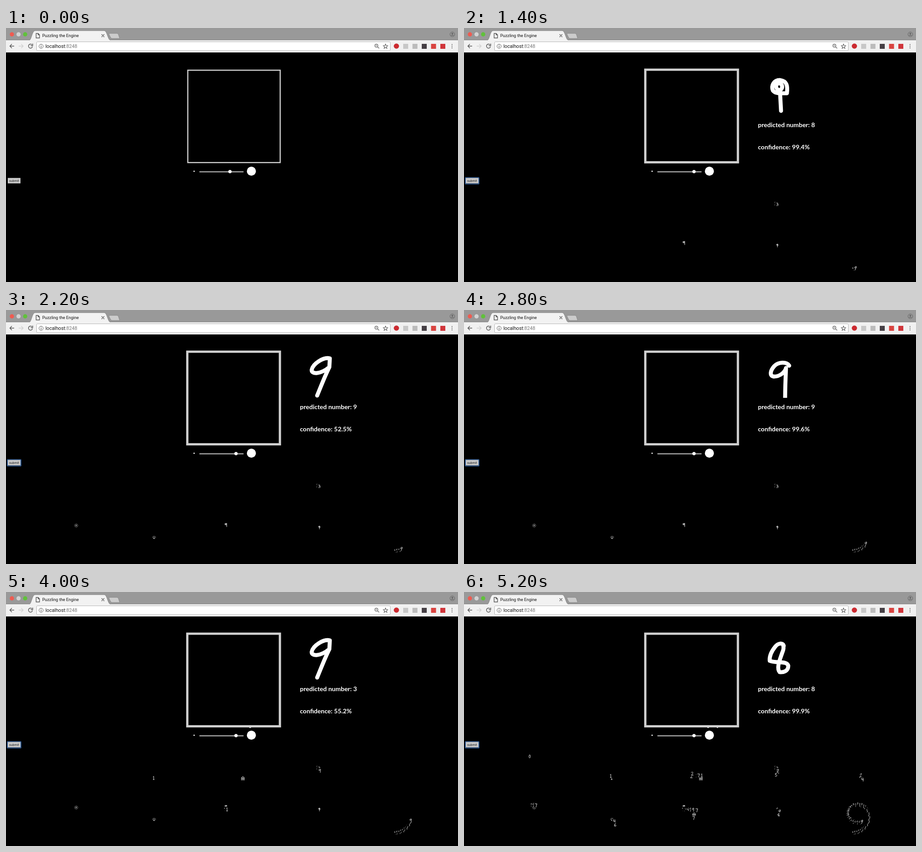
Write an HTML page with a canvas that moves like this. It is 998 px wide and 561 px high and loops after 6.2 s.

```html
<!DOCTYPE html>
<html lang="en">
<head>
<meta charset="utf-8">
<title>Digit sketches</title>
<style>
  html, body { margin: 0; width: 100%; height: 100%; overflow: hidden; background: #000; }
  svg, canvas { position: absolute; left: 0; top: 0; width: 998px; height: 561px; }
  text { font-family: Roboto, sans-serif; }
  .result { font: bold 14px Lato, sans-serif; fill: #fff; }
  .icon { fill: none; stroke: #555; stroke-width: 1.4; }
</style>
</head>
<body>
<svg viewBox="0 0 998 561">
  <!-- browser window -->
  <path fill="#999" d="M0 0H998V27H0z"/>
  <path fill="#f1f1f1" d="M0 27H998V54H0z"/>
  <path stroke="#858585" d="M0 26.5H998"/>
  <path fill="#f2f2f2" stroke="#808080" stroke-width=".8" d="M52 27C56 26 58 6 64 6H217C223 6 225 26 230 27"/>
  <path fill="#f2f2f2" d="M53 26H229V29H53z"/>
  <path fill="#ccc" stroke="#858585" stroke-width=".8" d="M229 12H245Q247 12 248 14L251 23H234Q232 23 231 21L227 13z"/>
  <circle cx="13" cy="14" r="4.7" fill="#ef5b51"/>
  <circle cx="27.7" cy="14" r="4.7" fill="#d2d2d2"/>
  <circle cx="42.3" cy="14" r="4.7" fill="#60c13b"/>
  <path class="icon" stroke-width="1" d="M66.5 12H71L74 15V22H66.5zM71 12V15H74M211 14L217 20M217 14L211 20"/>
  <text x="80" y="20" font-size="9.3" fill="#111">Puzzling the Engine</text>
  <g fill="none" stroke="#666">
    <circle cx="985.5" cy="14" r="5.2"/>
    <circle cx="985.5" cy="12.5" r="1.6" fill="#666"/>
    <path fill="#666" d="M982 17Q985.5 14.5 989 17"/>
  </g>
  <path class="icon" d="M18 40H8.5M13 35.5L8.5 40L13 44.5"/>
  <path class="icon" style="stroke:#d0d0d0" d="M28 40H38M33.5 35.5L38 40L33.5 44.5"/>
  <path class="icon" d="M57.5 37A4.5 4.5 0 1 0 58.5 41M59 34.5V39H54.5"/>
  <rect x="67.5" y="30.5" width="781" height="19.5" rx="2" fill="#fff" stroke="#b4b4b4"/>
  <circle class="icon" style="stroke-width:1" cx="77.5" cy="40.3" r="4.6"/>
  <path class="icon" d="M77.5 39.7V43M77.5 37.3V38.5"/>
  <text x="87" y="44" font-size="10.7" fill="#111">localhost<tspan fill="#777">:8248</tspan></text>
  <g class="icon" style="stroke-width:1.1">
    <circle cx="817.8" cy="39" r="3.4"/>
    <path d="M820.3 41.5L824 45M816 39H819.6"/>
    <path d="M838 35.5L839.4 38.8L843 39.1L840.2 41.4L841.2 45L838 43L834.8 45L835.8 41.4L833 39.1L836.6 38.8z"/>
  </g>
  <circle cx="862" cy="40" r="5.8" fill="#cb2a30"/>
  <rect x="877" y="35" width="11" height="11" fill="#c8c8c8"/>
  <rect x="897.5" y="35" width="11" height="11" fill="#bbb"/>
  <rect x="918" y="35" width="11" height="11" fill="#453f44"/>
  <rect x="938.5" y="35" width="11" height="11" fill="#d94440"/>
  <rect x="959" y="35" width="11" height="11" fill="#d0353a"/>
  <path stroke="#555" stroke-width="2" stroke-linecap="round" d="M984.8 36.5h.01M984.8 40.3h.01M984.8 44.1h.01"/>

  <!-- drawing page -->
  <rect id="frame" fill="none" stroke="#d0d0d0"/>
  <path id="drips" stroke="#ddd" stroke-width="1.6"/>
  <circle cx="415.3" cy="316.5" r="1.4" fill="#fff"/>
  <path stroke="#b5b5b5" stroke-width="2.4" stroke-linecap="round" d="M428 317.6H523.5"/>
  <circle id="thumb" cy="317.2" r="3.6" fill="#fff"/>
  <circle cx="541.8" cy="316.3" r="10" fill="#fff"/>
  <rect id="focus" x="3" y="330.5" width="30" height="14" rx="1" fill="none" stroke="#2b568f" stroke-width="2"/>
  <rect x="4" y="331.2" width="28" height="12" fill="#c9c9c9"/>
  <text x="7" y="340" font-size="7.1" fill="#222">submit</text>
  <text id="predicted" class="result" x="649" y="219"></text>
  <text id="confidence" class="result" x="649" y="267.5"></text>
  <path id="spiral" fill="none" d="M860 531C880 530 895 512 895 495C894 478 882 469 868 469C852 471 846 484 848 495C853 507 866 511 881 507"/>
</svg>
<canvas id="stage" width="998" height="561"></canvas>

<script>
const byId = id => document.getElementById(id);
const ctx = byId('stage').getContext('2d');
const STEP = 200, LAST = 26, LOOP = 6200;

// Sketches share one 100 px tile centred on (699, 144).
const sketches = {
  zero: 'M700 110C678 116 678 174 699 180C721 176 721 116 700 110',
  one: 'M688 120L700 108V181M687 181H713',
  two: 'M676 122C688 102 716 108 713 128C710 148 692 164 678 178H722',
  three: 'M687 114C696 113 706 112 712 116C722 123 713 135 692 147C706 139 725 142 728 154C724 166 705 175 687 174',
  four: 'M684 108L678 146H718M712 112V184',
  five: 'M718 110H685L682 140C700 132 720 142 717 160C712 178 694 181 680 173',
  six: 'M708 107C684 128 674 158 684 176C700 188 721 174 716 158C708 144 690 148 682 162',
  seven: 'M676 112H720C712 134 704 160 699 183',
  eight: 'M706 119C704 111 693 113 687 121C679 131 674 142 675 152C690 158 713 151 716 163C716 175 705 178 697 177C689 168 698 148 702 136C704 130 707 126 705 119',
  nine: 'M714 125L715 107C702 103 678 118 675 132C674 143 695 142 714 126C703 148 695 170 687 189',
  hook: 'M718 123C713 114 694 114 685 124C676 134 674 146 684 147C698 147 709 137 711 128C710 150 709 170 709 200',
  ring: 'M698 138C684 134 686 115 700 115C712 116 712 128 706 137C697 149 677 148 677 128C679 105 705 100 722 114C736 128 722 142 708 146C690 154 678 144 679 130M686 112C700 98 728 102 730 122C728 138 722 150 714 162C704 176 698 184 688 190',
  lollipop: 'M713 144C715 128 713 117 698 115C683 115 678 128 682 138C688 146 701 144 713 144M695 122C704 122 705 134 698 137C688 138 686 124 695 122M698 146L700 183',
  flag: 'M722 104V182M720 110H685V138H720M692 124H714',
  sun: 'M699 132A12 12 0 1 1 698 132M699 106V112M699 176V182M661 144H667M731 144H737M672 117L676 121M722 167L726 171M672 171L676 167M722 121L726 117',
  paw: 'M668 138V146M686 120V130M712 120V130M730 138V146M682 168C690 142 708 142 716 168C706 178 692 178 682 168',
  house: 'M668 190V140L699 105L730 140V190M689 190V156H710V190M668 142H730',
};
const paths = Object.fromEntries(Object.entries(sketches).map(([name, d]) => [name, new Path2D(d)]));

// One submission per step: sketch, predicted digit, confidence.
const results = [null,
  ['three', 3, '99.9'], ['three', 3, '100.0'], ['three', 3, '100.0'], ['hook', 9, '98.7'],
  ['flag', 7, '71.3'], ['nine', 9, '97.6'], ['lollipop', 8, '99.4'], ['sun', 5, '62.8'],
  ['paw', 6, '58.1'], ['hook', 9, '96.9'], ['nine', 9, '52.5'], ['hook', 9, '99.2'],
  ['nine', 9, '88.4'], ['hook', 9, '99.6'], ['nine', 7, '64.7'], ['hook', 9, '97.3'],
  ['ring', 9, '99.1'], ['one', 1, '99.5'], ['house', 2, '48.6'], ['nine', 3, '55.2'],
  ['hook', 8, '60.9'], ['hook', 9, '99.8'], ['two', 2, '99.7'], ['four', 4, '98.2'],
  ['six', 6, '99.3'], ['eight', 8, '99.9']];

// Miniatures: first step, sketch, centre. Later ones cover earlier ones.
const minis = [
  [1, 'three', 687, 388], [3, 'three', 691.5, 389.5],
  [5, 'flag', 485, 475], [7, 'lollipop', 692, 480],
  [8, 'sun', 155, 476], [9, 'paw', 327, 502],
  [15, 'nine', 484.5, 479], [18, 'one', 326, 410.5],
  [19, 'house', 523, 411], [20, 'hook', 693, 394],
  [20, 'one', 488, 480], [21, 'hook', 695.5, 483], [22, 'hook', 492, 480],
  [23, 'one', 525, 405], [23, 'three', 514, 406], [23, 'eight', 877, 404],
  [23, 'eight', 496, 480], [23, 'nine', 697, 485],
  [24, 'seven', 518, 405], [24, 'two', 502, 407], [24, 'five', 693, 399],
  [24, 'eight', 876, 409], [24, 'nine', 501, 480], [24, 'hook', 506, 480],
  [25, 'two', 504, 401], [25, 'five', 689, 404], [25, 'four', 880, 414],
  [25, 'seven', 514, 482], [25, 'house', 508, 491], [25, 'zero', 145, 363],
  [25, 'five', 150, 470], [25, 'nine', 154, 470], [25, 'four', 332, 506],
  [26, 'one', 324, 406], [26, 'seven', 159, 471], [26, 'six', 334, 514],
  [26, 'seven', 507, 499], [26, 'eight', 695, 492],
];

// The nines line up along a curve shaped like a nine.
const ninesAt = { 4: 1, 6: 2, 10: 3, 11: 4, 12: 5, 13: 7, 14: 8, 16: 9, 17: 10, 20: 11, 21: 12, 22: 13, 23: 16, 24: 20, 25: 29, 26: 38 };
for (let step = 0, count = 0; step <= LAST; step++) {
  for (; count < (ninesAt[step] || 0); count++) {
    const { x, y } = byId('spiral').getPointAtLength(count * 4.6);
    minis.push([step, count === 9 ? 'ring' : count % 2 ? 'nine' : 'hook', x, y]);
  }
}

function drawSketch(name, x, y, scale) {
  ctx.save();
  ctx.translate(x, y);
  ctx.scale(scale, scale);
  ctx.beginPath();
  ctx.rect(-50, -50, 100, 100);
  ctx.fillStyle = '#000';
  ctx.fill();
  ctx.clip();
  ctx.translate(-699, -144);
  ctx.strokeStyle = '#fff';
  ctx.lineWidth = 8.8;
  ctx.lineCap = ctx.lineJoin = 'round';
  ctx.stroke(paths[name]);
  ctx.restore();
}

function setAttributes(id, values) {
  for (const name in values) byId(id).setAttribute(name, values[name]);
}

function render(step) {
  const result = results[step];
  const inset = result ? 2.5 : 3.6, size = result ? 204.5 : 204;
  setAttributes('frame', { x: 397.8 + inset, y: 89.6 + inset, width: size, height: size, 'stroke-width': result ? 5 : 2.5 });
  setAttributes('thumb', { cx: step < 4 ? 494.5 : 507.8 });
  setAttributes('focus', { visibility: result ? 'visible' : 'hidden' });
  setAttributes('drips', { d: (step >= 20 ? 'M537 299.5H541' : '') + (step >= 25 ? 'M558 299.5H561' : '') });
  byId('predicted').textContent = result ? `predicted number: ${result[1]}` : '';
  byId('confidence').textContent = result ? `confidence: ${result[2]}%` : '';

  ctx.clearRect(0, 0, 998, 561);
  for (const [start, name, x, y] of minis) if (start <= step) drawSketch(name, x, y, 0.1);
  if (result) drawSketch(result[0], 699, 144, 1);
}

let shown = -1;
function tick() {
  const step = Math.min(LAST, Math.floor(performance.now() % LOOP / STEP));
  if (step !== shown) render(shown = step);
  requestAnimationFrame(tick);
}
tick();
</script>
</body>
</html>
```
